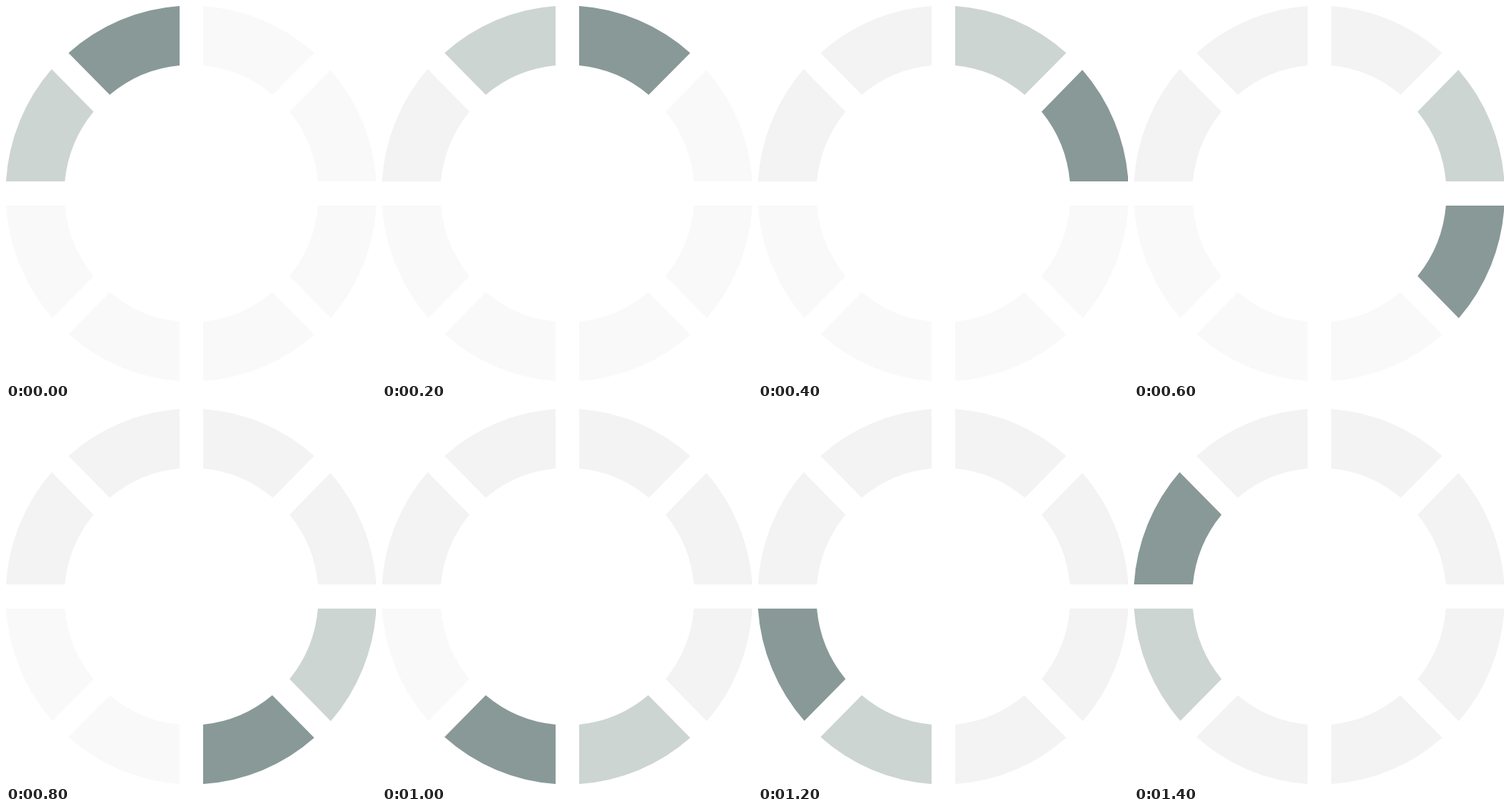
Recreate the animation shown at these times as an HTML page. Size 503 by 511 pixels, loop 1600 ms.

```html
<!DOCTYPE html>
<html lang="en">
<head>
<meta charset="utf-8">
<title>Ring loader</title>
<style>
  html, body { margin: 0; width: 100%; height: 100%; overflow: hidden; background: #fff; }
  svg { display: block; }
</style>
</head>
<body>
<svg id="ring" width="503" height="511" viewBox="0 0 503 511"></svg>
<script>
const STEP = 200;
const HEAD = '#889998', TAIL = '#cdd5d3', VISITED = '#f3f3f3', IDLE = '#f9f9f9';

// Clockwise from the top left: outer start, outer end, inner end, inner start
const corners = [
  ['85 64', '236 0', '236 81', '141 121'],
  ['268 0', '419 64', '362.5 121', '268 81'],
  ['441 87', '503.5 239', '424 239', '385.5 144'],
  ['503.5 272', '441.5 425.5', '385.5 368', '424 272'],
  ['419 448', '268 511', '268 430', '362 390'],
  ['236 511', '85 447', '141 390', '236 430'],
  ['63 425', '0 272', '80 272', '119 368'],
  ['0 239', '62 86', '119 144', '80 239']
];
const count = corners.length;
const last = count - 1;

const segments = corners.map(([a, b, c, d]) => {
  const path = document.createElementNS('http://www.w3.org/2000/svg', 'path');
  path.setAttribute('d', `M${a}A252.5 256 0 0 1 ${b}L${c}A173 175 0 0 0 ${d}Z`);
  return document.getElementById('ring').appendChild(path);
});

function colour(i, step) {
  if (i === step) return HEAD;
  if (i === (step + last) % count) return TAIL;
  // The last segment was lit as the tail of the first step
  return i < step || (i === last && step > 0) ? VISITED : IDLE;
}

function draw() {
  const step = Math.floor(performance.now() / STEP) % count;
  segments.forEach((path, i) => path.setAttribute('fill', colour(i, step)));
  requestAnimationFrame(draw);
}
draw();
</script>
</body>
</html>
```
